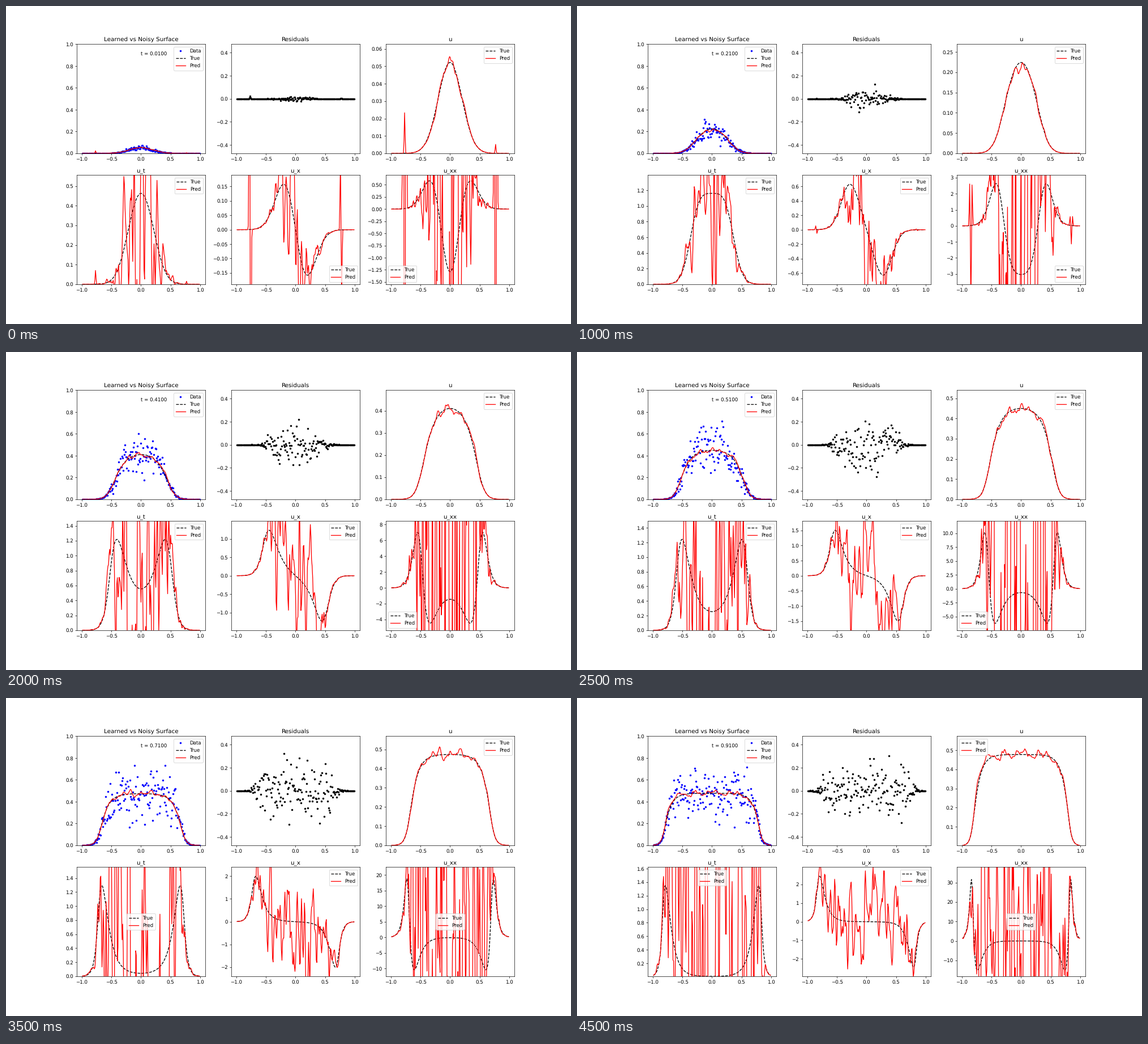
These frames come from a looping animation (998 by 561 pixels, 5 s). A matplotlib script:

```python
import numpy as np
import matplotlib.pyplot as plt
from matplotlib.animation import FuncAnimation

W, H, DPI = 998, 561, 62.375
STEPS, INTERVAL = 10, 500
CAP, RATE, DIFF = 0.478, 10.0, 0.02   # plateau height, growth, diffusion
DX, DT = 0.01, 0.0005

plt.rcParams.update({"font.family": "DejaVu Sans", "text.hinting": "none"})
grid = np.linspace(-1, 1, 201)
x = grid[1:-1]
times = 0.01 + 0.1 * np.arange(STEPS)

# Legend place from a given step on
LEGENDS = {
    "u": {0: "upper right", 9: "upper left"},
    "u_t": {0: "upper right", 6: "center", 8: "lower center",
            9: "upper center"},
    "u_x": {0: "lower right", 1: "upper right"},
    "u_xx": {0: "lower left", 1: "upper left", 2: "lower right",
             4: "lower left", 6: "center", 8: "lower center", 9: "center"},
}


def rhs(v):
    """Growth with density-dependent diffusion and closed ends."""
    flux = DIFF * 0.5 * (v[1:] + v[:-1]) * np.diff(v) / DX
    flux = np.concatenate([[0], flux, [0]])
    return np.diff(flux) / DX + RATE * v * (1 - v)


def solve():
    v = 0.1 * np.exp(-grid**2 / 0.08)
    states, step = [], 0
    for t in times:
        while step < round(t / DT):
            mid = v + 0.5 * DT * rhs(v)
            v = v + DT * rhs(mid)
            step += 1
        u = CAP * v
        states.append({"u": u[1:-1],
                       "u_t": CAP * rhs(v)[1:-1],
                       "u_x": np.gradient(u, DX)[1:-1],
                       "u_xx": np.diff(u, 2) / DX**2})
    return states


def ripple(rng, width):
    """Smoothed white noise with unit spread."""
    k = np.arange(-12, 13)
    kernel = np.exp(-0.5 * (k / width) ** 2)
    y = np.convolve(rng.standard_normal(x.size), kernel, mode="same")
    return y / y.std()


def edge_spikes(t):
    """Early spikes at both margins that shrink and drift outwards."""
    if t > 0.4:
        return np.zeros_like(x)
    pos = 0.765 + 0.4 * t
    left, right = (np.exp(-0.5 * ((x - c) / 0.007) ** 2) for c in (-pos, pos))
    return (0.03 * np.exp(-t / 0.035) + 0.001) * (left + 0.22 * right)


def predict(i, true):
    rng = np.random.default_rng(40 + i)
    t, u = times[i], true["u"]
    dev = u * (0.032 * ripple(rng, 2.5) + 0.015 * ripple(rng, 1))
    spikes = edge_spikes(t)
    spikes_x = np.gradient(spikes, DX)
    gain_t = 2 + 2.5 * t + 10 * np.exp(-t / 0.03)
    return {
        "u": u + dev + spikes,
        "u_t": true["u_t"] + gain_t * u * ripple(rng, 1) + 3 * spikes,
        "u_x": true["u_x"] + 2.6 * u * ripple(rng, 1) + spikes_x,
        "u_xx": true["u_xx"] + 100 * u * ripple(rng, 0.8)
        + np.gradient(spikes_x, DX),
    }


def sample(i, true):
    noise = np.random.default_rng(90 + i).standard_normal(x.size)
    return true["u"] * (1 + 0.24 * np.clip(noise, -2.7, 2.7))


def limits(y):
    lo, hi = 1.2 * y.min(), 1.2 * y.max()
    # keep the zero tick when it lies within half a pixel of the edge
    if 0 < lo < 0.5 * (hi - lo) / 192:
        lo = 0
    return lo, hi


def curves(ax):
    true_line, = ax.plot(x, 0 * x, "k--", label="True")
    pred_line, = ax.plot(x, 0 * x, "r-", label="Pred")
    return true_line, pred_line


truth = solve()
preds = [predict(i, s) for i, s in enumerate(truth)]
data = [sample(i, s) for i, s in enumerate(truth)]

fig, axes = plt.subplots(2, 3, figsize=((W + 0.01) / DPI, (H + 0.01) / DPI),
                         dpi=DPI)
fig.subplots_adjust(left=0.125, right=0.9, top=0.8797, bottom=0.125,
                    wspace=0.2, hspace=0.2)

surface, resid = axes[0, :2]
surface.set_title("Learned vs Noisy Surface")
dots, = surface.plot(x, 0 * x, "b.", label="Data")
surface_lines = curves(surface)
surface.set_ylim(0, 1)
surface.legend(loc="upper right")
clock = surface.text(0, 0.9, "")

resid.set_title("Residuals")
resid_dots, = resid.plot(x, 0 * x, "k.")
resid.set_ylim(-0.473, 0.473)

panels = {}
for name, ax in zip(LEGENDS, axes.flat[2:]):
    ax.set_title(name)
    lines = curves(ax)
    panels[name] = ax, lines, ax.legend(loc="upper right")


def draw(i):
    true, pred = truth[i], preds[i]
    dots.set_ydata(data[i])
    surface_lines[0].set_ydata(true["u"])
    surface_lines[1].set_ydata(pred["u"])
    clock.set_text(f"t = {times[i]:.4f}")
    resid_dots.set_ydata(pred["u"] - data[i])
    for name, (ax, lines, legend) in panels.items():
        lines[0].set_ydata(true[name])
        lines[1].set_ydata(pred[name])
        ax.set_ylim(*limits(true[name]))
        places = LEGENDS[name]
        legend.set_loc(places[max(k for k in places if k <= i)])
    return []


anim = FuncAnimation(fig, draw, frames=STEPS, interval=INTERVAL,
                     init_func=lambda: draw(0), repeat=True, repeat_delay=0,
                     blit=False)
plt.show()
```
